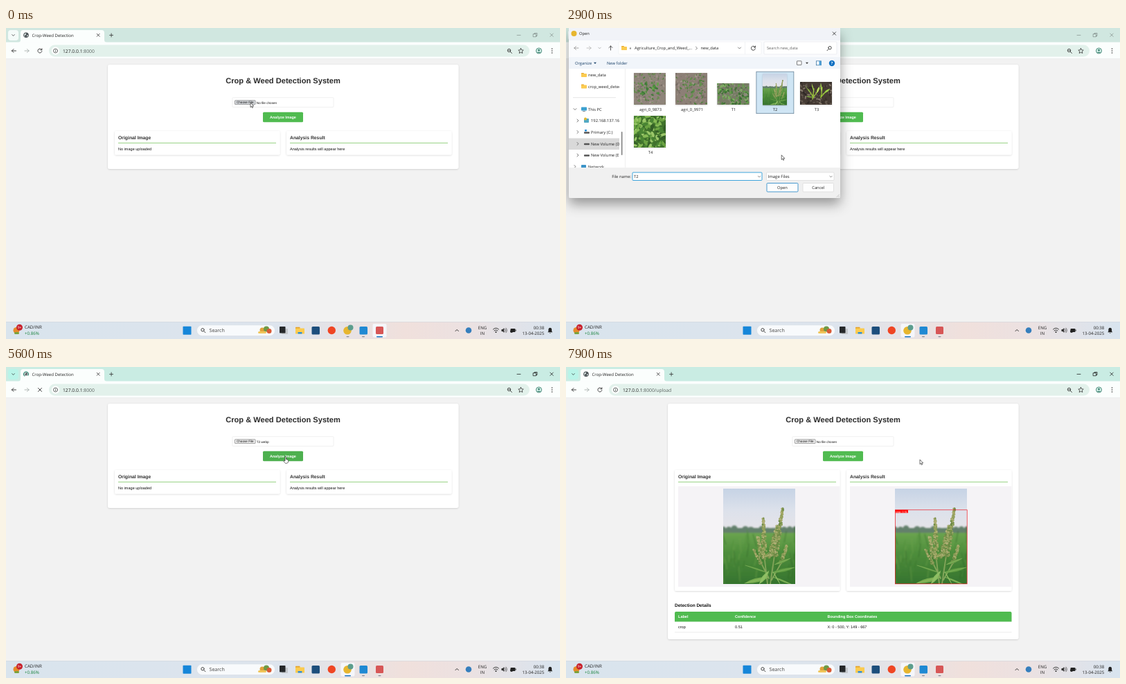
Animation, 800 px wide and 450 px high, one loop 8000 ms. Source, as an HTML page:

```html
<!DOCTYPE html>
<html lang="en">
<head>
<meta charset="utf-8">
<title>Crop-Weed Detection</title>
<style>
  html, body { margin: 0; width: 100%; height: 100%; overflow: hidden; background: #f2f2f2; }
  svg { display: block; text-rendering: geometricPrecision; }
  #stage { width: 800px; height: 450px; }
  .ui { font-family: "Open Sans", "Noto Sans", sans-serif; }
  .web { font-family: "Liberation Sans", Arial, sans-serif; }
</style>
</head>
<body>
<svg id="stage" viewBox="0 0 800 450"></svg>
<script>
const LOOP = 8000, STEP = 100;
const OPEN = 200, PICK = 1900, PRESS = 3600, SHUT = 3900, SEND = 5400, DONE = 6200, LOADED = 6300;
const GREEN = '#50bb50';

// Drawing helpers
const attrs = o => Object.entries(o).map(([k, v]) => ` ${k}="${v}"`).join('');
const rect = (x, y, w, h, fill, o = {}) =>
  `<rect x="${x}" y="${y}" width="${w}" height="${h}" fill="${fill}"${attrs(o)}/>`;
const dot = (x, y, r, fill, o = {}) => `<circle cx="${x}" cy="${y}" r="${r}" fill="${fill}"${attrs(o)}/>`;
const fillPath = (d, fill, o = {}) => `<path d="${d}" fill="${fill}"${attrs(o)}/>`;
const line = (d, color = '#333', width = .8, o = {}) =>
  `<path d="${d}" fill="none" stroke="${color}" stroke-width="${width}" stroke-linecap="round" stroke-linejoin="round"${attrs(o)}/>`;
const text = (cls, x, y, s, size, fill, o) =>
  `<text class="${cls}" x="${x}" y="${y}" font-size="${size}" fill="${fill}"${attrs(o)}>${s}</text>`;
const ui = (x, y, s, size = 5.8, fill = '#222', o = {}) => text('ui', x, y, s, size, fill, o);
const web = (x, y, s, size = 5.56, fill = '#111', o = {}) => text('web', x, y, s, size, fill, o);
const group = (id, body, o = {}) => `<g id="${id}"${attrs(o)}>${body}</g>`;
const box = (x, y, w, h, view, body) =>
  `<svg x="${x}" y="${y}" width="${w}" height="${h}" viewBox="${view}" preserveAspectRatio="none" overflow="hidden">${body}</svg>`;
const mid = { 'text-anchor': 'middle' }, end = { 'text-anchor': 'end' }, bold = { 'font-weight': 700 };
const chevron = (x, y, color = '#444', r = 2) => line(`M${x - r} ${y - r / 2}l${r} ${r}l${r} ${-r}`, color, .7);
const chevronRight = (x, y) => line(`M${x - 1} ${y - 2}l2 2l-2 2`, '#444', .7);
const arrow = (x, y, dir, color) =>
  line(`M${x - 3} ${y}h6M${x + 3 * dir} ${y}l${-2.5 * dir} -2.5M${x + 3 * dir} ${y}l${-2.5 * dir} 2.5`, color, .9);
const reload = (x, y) => line(`M${x + 2.6} ${y - 1.4}a3 3 0 1 0 .3 2M${x + 2.9} ${y - 3.2}v2h-2`, '#333', .9);
const lens = (x, y) => line(`M${x + 1.3} ${y + 1.3}l2.2 2.2M${x + 1.7} ${y - .5}a2.2 2.2 0 1 1 -4.4 0a2.2 2.2 0 1 1 4.4 0`, '#333', .9);
const folder = (x, y, w = 8) =>
  rect(x, y - w * .38, w * .5, w * .4, '#e3a32c', { rx: .6 }) + rect(x, y - w * .25, w, w * .62, '#fbcb50', { rx: .6 });

function rng(seed) {
  return () => (seed = (seed * 16807) % 2147483647) / 2147483647;
}

// Photo stand-ins
function speckle(x, y, w, h, base, colors, count, seed, size = 2.5, spread = 1) {
  const r = rng(seed);
  let s = rect(0, 0, w, h, base);
  for (let i = 0; i < count; i++) {
    const px = w / 2 + (r() - .5) * w * spread, py = h / 2 + (r() - .5) * h * spread;
    const rx = size * (.4 + r()), turn = r() * 180;
    s += `<ellipse cx="${px.toFixed(1)}" cy="${py.toFixed(1)}" rx="${rx.toFixed(1)}" ry="${(rx * .5).toFixed(1)}" fill="${colors[Math.floor(r() * colors.length)]}" transform="rotate(${turn.toFixed(0)} ${px.toFixed(1)} ${py.toFixed(1)})"/>`;
  }
  return box(x, y, w, h, `0 0 ${w} ${h}`, s);
}

function spike(x1, y1, x2, y2, width, seed) {
  const r = rng(seed), n = Math.round((y2 - y1) * 2.2);
  let s = line(`M${x1} ${y1}L${x2} ${y2}`, '#718a48', width * .6);
  for (let i = 0; i < n; i++) {
    const k = i / n, spread = width * (.35 + k * .8);
    s += dot((x1 + (x2 - x1) * k + (r() - .5) * spread * 1.6).toFixed(1), (y1 + (y2 - y1) * k).toFixed(1),
      (.6 + r() * 1.1).toFixed(1), ['#889b56', '#a2a866', '#6c8b45', '#b0b078'][Math.floor(r() * 4)]);
  }
  return s;
}

function leaf(x1, y1, x2, y2, bend, fill) {
  const mx = (x1 + x2) / 2, my = (y1 + y2) / 2;
  return fillPath(`M${x1} ${y1}Q${mx - bend} ${my - bend}  ${x2} ${y2}Q${mx + bend} ${my + bend} ${x1} ${y1}`, fill) +
    line(`M${x1} ${y1}L${x2} ${y2}`, '#a4ca79', .4);
}

function plantPhoto() {
  const r = rng(77);
  let s = rect(0, 0, 104, 68, 'url(#sky)');
  s += `<g filter="url(#soft)">` + rect(-4, 57, 112, 12, '#66806a');
  for (let i = 0; i < 14; i++) s += dot(i * 8, 58 + r() * 4, 3 + r() * 2, '#64806c');
  s += rect(-4, 64, 112, 80, 'url(#field)');
  for (let i = 0; i < 70; i++) {
    const x = r() * 108 - 2, y = 76 + r() * 62;
    s += line(`M${x.toFixed(1)} ${y.toFixed(1)}l${(r() * 10 - 5).toFixed(1)} ${(-8 - r() * 14).toFixed(1)}`,
      ['#6ea44d', '#36702b', '#4d8d39', '#2d6427'][i % 4], 1.1, { opacity: .65 });
  }
  s += '</g>';
  s += line('M68 138L75 90M64 138L58 86M66 130L50 98M70 132L88 100', '#83a45a', 1.8);
  s += spike(86, 29, 74, 98, 5.5, 5) + spike(58, 43, 59, 102, 5, 9) + spike(50, 70, 56, 100, 4, 13) +
    spike(78, 54, 66, 100, 4.5, 21) + spike(92, 82, 83, 108, 3.5, 25) + spike(44, 88, 55, 110, 3, 31);
  s += leaf(66, 122, 32, 111, 4, '#5c963f') + leaf(66, 128, 31, 137, 5, '#79ad50') + leaf(70, 122, 103, 114, 4, '#619d42') +
    leaf(72, 128, 98, 138, 5, '#70a64c') + leaf(66, 119, 52, 138, 4, '#8bbd61') + leaf(72, 120, 82, 138, -4, '#87b95a') +
    leaf(74, 110, 97, 101, 3, '#6b9f48');
  return s;
}

const defs = `<defs>
  <linearGradient id="sky" x2="0" y2="1"><stop stop-color="#c6d3e5"/><stop offset=".45" stop-color="#dce1eb"/><stop offset="1" stop-color="#e9e5e8"/></linearGradient>
  <linearGradient id="field" x2="0" y2="1"><stop stop-color="#6ba44f"/><stop offset=".35" stop-color="#4f8e3c"/><stop offset="1" stop-color="#32702c"/></linearGradient>
  <linearGradient id="bar"><stop stop-color="#d9e4ed"/><stop offset=".5" stop-color="#dde4ed"/><stop offset=".72" stop-color="#f0e0dc"/><stop offset=".83" stop-color="#ece1e1"/><stop offset="1" stop-color="#d8e4ef"/></linearGradient>
  <filter id="soft" x="-10%" y="-10%" width="120%" height="120%"><feGaussianBlur stdDeviation=".8"/></filter>
  <filter id="lift" x="-10%" y="-10%" width="120%" height="130%"><feDropShadow dx="0" dy=".7" stdDeviation="1.2" flood-opacity=".17"/></filter>
  <filter id="deep" x="-15%" y="-15%" width="130%" height="140%"><feDropShadow dx="0" dy="9" stdDeviation="9" flood-opacity=".38"/></filter>
  <symbol id="plant" viewBox="0 0 104 138" preserveAspectRatio="none">${plantPhoto()}</symbol>
</defs>`;
const plant = (x, y, w, h) => `<use href="#plant" x="${x}" y="${y}" width="${w}" height="${h}"/>`;

function browser() {
  const globe = dot(0, 0, 3.8, '#4b5256') + fillPath('M-2.8 -1.2q1.6 -1.6 3 -1.2l-.6 2l-1.6 .6l.6 1.6l-1 .6zM1 .2l1.9 -.4q-.2 2 -1.7 2.6z', '#dfeae7');
  return rect(0, 0, 800, 21, '#c9ece3', { id: 'strip' }) +
    rect(3, 3, 15, 15, '#b9f4e8', { rx: 4, id: 'tabMenu' }) + chevron(10.5, 10.5, '#222', 1.8) +
    fillPath('M17 21q4 0 4 -4v-10q0 -4 4 -4h113q4 0 4 4v10q0 4 4 4z', '#fbfefd') +
    rect(0, 20.5, 800, 24, '#fbfefd') + rect(0, 44, 800, .6, '#dfe7e4') +
    `<g transform="translate(29 10.3)">${group('globe', globe)}${group('spinner', line('M0 -3.4a3.4 3.4 0 1 1 -3.4 3.4', '#21806b', 1))}</g>` +
    ui(37.5, 12.8, 'Crop-Weed Detection', 6.05) +
    line('M131.2 8.3l4 4M135.2 8.3l-4 4M149.6 10.4h5M152.1 7.9v5', '#333', .8) +
    group('controls', line('M738 10.4h5M761.5 8.7h4v4h-4zM763 8.7v-1.2h4v4h-1.4M785.8 8l4.4 4.4M790.2 8l-4.4 4.4', '#222', .8)) +
    arrow(11.5, 33, -1, '#333') + arrow(30, 33, 1, '#a9b0ae') + group('reload', reload(49, 33)) +
    group('stop', line('M46.5 30.5l5 5M51.5 30.5l-5 5', '#333', .9)) +
    rect(62, 24.5, 694, 17, '#e2f1eb', { rx: 8.5 }) + dot(71.5, 33, 5.8, '#fbfefd') +
    line('M74.5 33a3 3 0 1 1 -6 0a3 3 0 1 1 6 0M71.5 32.8v1.6M71.5 31.3v.1', '#333', .7) +
    `<text class="ui" x="82" y="35.5" font-size="6.75" fill="#222">127.0.0.1<tspan id="path" fill="#58615e">:8000</tspan></text>` +
    lens(727, 33) + line('M725.3 32.5h2.4', '#333', .6) +
    line('M743.5 29.4l1.1 2.4l2.6 .3l-1.9 1.8l.5 2.6l-2.3 -1.3l-2.3 1.3l.5 -2.6l-1.9 -1.8l2.6 -.3z', '#333', .8) +
    dot(769.5, 33, 4, '#d5f2ea', { stroke: '#27705f', 'stroke-width': .8 }) + dot(769.5, 32, 1.3, '#27705f') +
    fillPath('M767 35.7q2.5 -2.6 5 0z', '#27705f') + [30, 33, 36].map(y => dot(788.5, y, .8, '#333')).join('');
}

function panel(x, title, note) {
  return rect(x, 149, 238.5, 34.5, '#fff', { rx: 2, filter: 'url(#lift)', class: 'panel' }) +
    web(x + 5, 161, title, 6.82, '#333', bold) + rect(x + 5, 165.9, 228, .8, '#7dc663') +
    web(x + 5, 177, note, 5.56, '#111', { class: 'note' });
}

function page() {
  const shot = x => rect(x, 172.5, 233.3, 145.5, '#f5f3f6') + plant(x + 65, 176, 104, 138);
  const cols = [162, 244, 377.5];
  const row = (y, cells, fill, o) => cells.map((c, i) => web(cols[i], y, c, 5.56, fill, o)).join('');
  return rect(0, 44.5, 800, 381, '#f2f2f2') +
    rect(147, 53, 506.5, 151, '#fff', { rx: 3, filter: 'url(#lift)', id: 'card' }) +
    web(400, 80.3, 'Crop &amp; Weed Detection System', 11.1, '#2b2b2b', { ...bold, ...mid }) +
    rect(327, 100.7, 146, 13.8, '#fff', { rx: 1, stroke: '#e6e6e6', 'stroke-width': .6 }) +
    rect(330.5, 104.8, 29.6, 5.8, '#efefef', { rx: .6, stroke: '#666', 'stroke-width': .6, id: 'choose' }) +
    web(345.3, 109.3, 'Choose File', 4.63, '#000', mid) + web(361.8, 109.5, 'No file chosen', 4.63, '#111', { id: 'chosen' }) +
    rect(371, 121.8, 58, 14.4, GREEN, { rx: 1.5, id: 'analyze' }) + web(400, 130.9, 'Analyze Image', 5.45, '#fff', { ...bold, ...mid }) +
    panel(157, 'Original Image', 'No image uploaded') + panel(405, 'Analysis Result', 'Analysis results will appear here') +
    group('results', shot(162) + shot(410) +
      rect(475.4, 206.8, 103.8, 107, 'none', { stroke: '#ec1c24', 'stroke-width': .7 }) +
      rect(475.4, 206.8, 18.5, 4.4, '#f00') + web(476, 210.5, 'crop: 0.51', 3.8, '#fff') +
      web(157, 347, 'Detection Details', 6.5, '#111', bold) + fillPath('M157 368.5v-12.5q0 -2 2 -2h482.500q2 0 2 2v12.5z', GREEN) +
      row(363.2, ['Label', 'Confidence', 'Bounding Box Coordinates'], '#fff', bold) +
      row(378.2, ['crop', '0.51', 'X: 0 - 500, Y: 149 - 667'], '#111') + rect(157, 383.6, 486.5, .6, '#dedede'));
}

function taskbar() {
  const under = x => rect(x - 2, 446, 4, 1.2, '#858b94', { rx: .6 });
  const tile = (id, x) => group(id, rect(x - 10, 428, 20, 19.5, '#f5f6fa', { rx: 2 }) + rect(x - 4.5, 446, 9, 1.4, '#1674c4', { rx: .7 }));
  return rect(0, 425, 800, 25, 'url(#bar)') + rect(0, 425, 800, .5, '#ccd3da') +
    dot(15, 437.5, 4.5, '#e58a2c') + dot(19.5, 433.3, 4.5, '#c8202b') + ui(19.5, 435.3, '9+', 5, '#fff', mid) + rect(12, 440, 7, 3, '#7aa23b', { rx: 1.5 }) +
    ui(27, 435.4, 'CAD/INR', 6.2) + ui(27, 443.8, '+0.86%', 6.2, '#17803a') +
    rect(255.500, 431.7, 12, 12, '#1686d9', { rx: .8 }) +
    rect(275.5, 429.8, 113, 15.8, '#f8fafc', { rx: 7.9, stroke: '#d3d8de', 'stroke-width': .5 }) + lens(284.5, 437.3) + ui(293.5, 440.2, 'Search', 7.1, '#444') +
    dot(370, 437, 3.5, '#e0a23a') + dot(376, 435.5, 4, '#6f9a45') + dot(380, 438.5, 3.5, '#d95a35') + rect(364, 439, 12, 3, '#f0c65a', { rx: 1.5 }) +
    rect(398, 435, 9, 8, '#c4c8cc', { rx: .8 }) + rect(395, 432, 8.5, 9.5, '#25282b', { rx: .8 }) +
    folder(418, 437.8, 13) + rect(421.5, 440, 6, 2.6, '#2d8fd8', { rx: .6 }) +
    rect(441.5, 432, 11.5, 11.5, '#1c4e7c', { rx: 1.5 }) + dot(470.3, 437.5, 5.7, '#ef4523') +
    under(493.5) + under(516) + under(539.5) + tile('browserTile', 493.5) + tile('clipTile', 539.5) +
    dot(493, 437.8, 5.8, '#e7b62f') + dot(497.5, 433.5, 4, '#5c9d8e') +
    rect(510.5, 432, 11.5, 11.5, '#2089d3', { rx: 1.5 }) + rect(534, 432, 11, 11, '#d75656', { rx: 1.5 }) +
    line('M649 438.6l2.2 -2.2l2.2 2.2', '#222', .9) + dot(668, 437.5, 4.3, '#357ebd') +
    ui(688, 435.5, 'ENG', 6.1, '#222', mid) + ui(688, 443.6, 'IN', 6.1, '#222', mid) +
    line('M703.5 436q4 -3.8 8 0M705 437.9q2.500 -2.3 5 0', '#222', .9) + dot(707.5, 440, 1, '#222') +
    fillPath('M715.5 436h1.600l2.2 -2v7l-2.200 -2h-1.600z', '#333') + line('M720.700 435.500q1.500 2 0 4M722 434.200q2.800 3.300 0 6.600', '#333', .7) +
    rect(728.500, 435, 7, 5, '#222', { rx: 1 }) + rect(735.700, 436.500, .9, 2, '#222') + dot(730, 439, 2, '#222') +
    ui(777.3, 435.6, '00:38', 6.1, '#222', end) + ui(777.3, 443.800, '13-04-2025', 6.1, '#222', end) +
    fillPath('M782.300 440.200l1 -1.500v-2.500q.2 -2.400 2.400 -2.400t2.400 2.400v2.500l1 1.500zM784.700 441h2q-1 1.500 -2 0z', '#222');
}

const tileX = i => 94.5 + 60 * i;

function sidebar() {
  const row = (y, label, icon) => chevronRight(13, y - 17) + icon + ui(32, y - 14.9, label);
  const drive = y => rect(22, y - 18.2, 8, 2.4, '#555', { rx: .8 });
  return box(4, 59, 73, 143, '0 0 73 143', `<g transform="translate(-4 -42)">` +
    rect(4, 142.5, 73, 16.5, '#d9d9d9') + folder(22, 51) + ui(32, 53, 'new_data') + folder(22, 67.5) + ui(32, 69.6, 'crop_weed_detection') +
    rect(10, 83.5, 62, .6, '#d5d5d5') + chevron(13, 100.500, '#444') + rect(22, 97.5, 8, 5, '#3ba0cf', { rx: .7 }) + rect(24, 103, 4, .8, '#66757f') + ui(32, 102.6, 'This PC') +
    `<g transform="translate(4 0)">` + row(134, '192.168.137.16', rect(22, 114, 7, 6, '#51a9c4', { rx: .7 }) + dot(24, 114.500, 2, '#e0b833')) +
    row(150.5, 'Primary (C:)', drive(151.5) + rect(23, 130, 3, 2.5, '#2a8dd6')) +
    row(167.5, 'New Volume (D:)', drive(168)) + row(184, 'New Volume (E:)', drive(184.500)) + '</g>' +
    chevronRight(13, 183.500) + rect(22, 181, 7, 5, '#3c94c8', { rx: .7 }) + ui(32, 186, 'Network') + '</g>') +
    rect(79.8, 150, 1.7, 34, '#858585', { rx: .8 }) + rect(85, 59, .6, 143, '#e5e5e5');
}

function thumbs() {
  const soil = ['#8f8379', '#a3968c', '#786d66', '#6d8a55', '#52813f', '#998b82'];
  const labels = ['agri_0_9873', 'agri_0_9971', 'T1', 'T2', 'T3'];
  const frame = (x, y, w, h) => rect(x, y, w, h, '#888', { filter: 'url(#lift)' });
  const sprout = box(338, 78, 46, 33, '0 0 46 33', speckle(0, 0, 46, 33, '#453b34', ['#2f2926', '#655a50', '#85796c', '#39312b'], 90, 41, 2) +
    line('M18 25L20 10M19 22L12 11M30 23L32 8M30 22L38 13M18 24L25 14', '#9bcb36', 1.3) +
    leaf(20, 14, 17, 3, 2, '#a9df3e') + leaf(13, 14, 8, 6, 2, '#86bd31') + leaf(31, 14, 30, 2, 2, '#b3e44a') +
    leaf(35, 16, 43, 10, 2, '#9bd23c') + leaf(24, 16, 28, 7, 2, '#c2ea59') + leaf(18, 22, 9, 21, 2, '#79b12f'));
  return frame(98, 65, 46, 46) + speckle(98, 65, 46, 46, '#8e847a', soil, 200, 3, 1.8) +
    speckle(107, 78, 28, 20, 'none', ['#4f8c3f', '#69a14e', '#3d7a36'], 34, 8, 2.5, .9) +
    frame(158, 65, 46, 46) + speckle(158, 65, 46, 46, '#8c7f76', soil, 200, 14, 1.8) +
    speckle(172, 70, 26, 32, 'none', ['#4f8344', '#638f4d'], 20, 18, 2.300, .9) +
    frame(218.5, 80, 46, 31) + speckle(218.5, 80, 46, 31, '#787c66', ['#49823b', '#639a4a', '#8c8d7b', '#3a6d32', '#7fae62'], 170, 23, 2) +
    frame(284, 66, 35, 45.5) + plant(284, 66, 35, 45.5) + frame(338, 78, 46, 33) + sprout +
    frame(98, 127, 46, 46) + speckle(98, 127, 46, 46, '#40722c', ['#6ba342', '#86ba55', '#4a8534', '#9bc76a', '#345f27'], 170, 33, 3.6) +
    labels.map((s, i) => ui(tileX(i) + 27.5, 120.2, s, 5.8, '#222', mid)).join('') + ui(122, 182, 'T4', 5.8, '#222', mid);
}

function dialog() {
  const field = { stroke: '#d4d4d4', 'stroke-width': .6, rx: 1 };
  return fillPath('M4 0H396V243q0 3 -3 3H7q-3 0 -3 -3z', '#f0f0f0', { filter: 'url(#deep)' }) +
    rect(4, 0, 392, 18, '#f1f3f8') + rect(4, 18, 392, 24, '#fafbfd') + rect(4, 42, 392, 17, '#f1f5fa') + rect(4, 59, 392, 143, '#fff') +
    dot(11.5, 8, 4, '#e7b62f') + ui(19, 10.2, 'Open') + line('M385.2 5.800l4.400 4.400M389.600 5.800l-4.400 4.400', '#222', .8) +
    arrow(15, 29, -1, '#999') + arrow(33, 29, 1, '#bbb') + chevron(48.5, 29, '#999', 1.7) + line('M64.500 32v-6M62 28.500l2.500 -2.500l2.500 2.500', '#333', .8) +
    rect(76, 20, 206, 18, '#fff', { ...field, stroke: '#eceef1' }) + folder(80, 29) + ui(91.5, 31, '«') + ui(99, 31, 'Agriculture_Crop_and_Weed_...') +
    chevronRight(188.5, 29.2) + ui(194.5, 31, 'new_data') + chevron(250.5, 29) + rect(258.500, 20, .5, 18, '#e5e7ea') + reload(270.5, 29.2) +
    rect(286, 20, 105, 18, '#fff', { ...field, stroke: '#e2e5e9' }) + ui(290, 31.2, 'Search new_data', 5.7, '#666') +
    `<g transform="translate(761 0) scale(-1 1)">${lens(380.5, 29.2)}</g>` +
    ui(13, 53, 'Organize', 5.8, '#173f67') + fillPath('M40 49.800h4l-2 2.200z', '#173f67') + ui(59, 53, 'New folder', 5.8, '#173f67') +
    rect(333.5, 47.8, 6.5, 5.6, '#fff', { stroke: '#444', 'stroke-width': .7, rx: .4 }) + fillPath('M346 49.800h4l-2 2.200z', '#333') +
    rect(361.5, 47.8, 7, 6, '#fff', { stroke: '#27679c', 'stroke-width': .7 }) + rect(365.5, 47.8, 3, 6, '#4b9fd7') +
    dot(384, 51, 4.2, '#0b6fc2') + ui(384, 53.2, '?', 6, '#fff', { ...mid, ...bold }) +
    sidebar() + rect(0, 63, 55, 61, '#eaf3fb', { id: 'hover' }) +
    rect(tileX(3) + .4, 63.2, 54, 60.5, '#cfe5f4', { stroke: '#55738a', 'stroke-width': .7, id: 'picked' }) + thumbs() +
    ui(94, 217, 'File name:', 5.85, '#222', end) + rect(96, 209, 187, 11.5, '#fff', { ...field, id: 'nameBox' }) +
    ui(98, 217, 'T2', 5.8, '#222', { id: 'name' }) + rect(97.6, 211.3, .5, 7, '#222', { id: 'caret' }) + chevron(279, 215, '#555', 1.6) +
    rect(289.5, 209, 97.5, 11.5, '#fff', field) + ui(291.5, 217, 'Image Files', 6) + chevron(382.5, 215, '#555', 1.6) +
    rect(290, 224.5, 45, 12.500, '#fdfdfd', { stroke: '#1b81c5', 'stroke-width': .8, rx: 1.2, id: 'openBtn' }) +
    rect(291.500, 226, 42, 9.5, 'none', { stroke: '#333', 'stroke-width': .4, 'stroke-dasharray': '.6 .6', id: 'focusRing' }) +
    ui(312.5, 232.800, 'Open', 5.8, '#222', mid) + rect(342, 224.5, 44.500, 12.500, '#fdfdfd', field) + ui(364.2, 232.8, 'Cancel', 5.8, '#222', mid) +
    line('M391 244.500l3.500 -3.500M393.300 244.500l1.200 -1.200', '#aaa', .6);
}

const ink = { stroke: '#111', 'stroke-width': .6, 'stroke-linejoin': 'round' };
const pointer = group('pointer',
  group('arrow', fillPath('M0 0v6.700l1.500 -1.400l1 2.300l1.100 -.5l-1 -2.200h2.100z', '#fff', ink)) +
  group('hand', fillPath('M-1 1q0 -1 .8 -1t.8 1v3q3.200 .2 3.200 2.200q0 3.400 -2.300 3.600h-2q-1 -.5 -2.700 -3.400q.5 -1.200 2.200 0z', '#fff', ink)));

const stage = document.getElementById('stage');
stage.innerHTML = defs + browser() + page() + taskbar() + group('dialog', dialog()) + pointer;

const el = {};
stage.querySelectorAll('[id]').forEach(n => el[n.id] = n);
const panels = stage.querySelectorAll('.panel'), notes = stage.querySelectorAll('.note');
const show = (node, on) => node.setAttribute('visibility', on ? 'inherit' : 'hidden');
const set = (node, key, value) => node.setAttribute(key, value);

// Pointer stops: time, x, y
const stops = [
  [0, 353, 108], [1000, 353, 108], [1800, 308, 97], [2300, 308, 97], [3300, 313, 231], [3900, 313, 231],
  [4500, 370, 164], [5000, 404, 129.5], [6400, 404, 129.5], [7400, 511, 134], [8000, 511, 134]
];

function pointerAt(t) {
  const i = stops.findIndex((s, n) => n === stops.length - 1 || t < stops[n + 1][0]);
  const a = stops[i], b = stops[i + 1] || a;
  const k = b === a ? 0 : (t - a[0]) / (b[0] - a[0]), e = k * k * (3 - 2 * k);
  return [a[1] + (b[1] - a[1]) * e, a[2] + (b[2] - a[2]) * e];
}

function draw(t) {
  const [x, y] = pointerAt(t);
  const inside = (l, top, w, h) => x >= l && x <= l + w && y >= top && y <= top + h;
  const open = t >= OPEN && t < SHUT, active = t >= SHUT, done = t >= DONE;
  const loading = t >= SEND && t < LOADED, onButton = !open && inside(371, 122, 58, 14);

  set(el.strip, 'fill', active ? '#c9ece3' : '#d0e7e0');
  set(el.tabMenu, 'fill', active ? '#b9f4e8' : '#f4fbf9');
  set(el.controls, 'opacity', active ? 1 : .4);
  show(el.clipTile, t < OPEN);
  show(el.browserTile, t >= OPEN);
  show(el.spinner, loading);
  set(el.spinner, 'transform', `rotate(${t * .36 % 360})`);
  set(el.globe, 'transform', `scale(${loading || (t >= LOADED && t < LOADED + 200) ? .6 : 1})`);
  show(el.reload, !loading);
  show(el.stop, loading);
  el.path.textContent = done ? ':8000/upload' : ':8000';

  set(el.choose, 'fill', t < SHUT ? '#d7dade' : '#efefef');
  el.chosen.textContent = active && !done ? 'T2.webp' : 'No file chosen';
  set(el.analyze, 'fill', onButton ? '#4db04f' : GREEN);
  set(el.card, 'height', done ? 341 : 151);
  panels.forEach(p => set(p, 'height', done ? 175 : 34.5));
  notes.forEach(n => show(n, !done));
  show(el.results, done);

  show(el.dialog, open);
  if (open) {
    const col = Math.floor((x - tileX(0)) / 60), picked = t >= PICK, typing = t < PRESS;
    show(el.hover, y >= 63 && y <= 124 && inside(tileX(col), 63, 55, 61));
    set(el.hover, 'x', tileX(col));
    show(el.picked, picked);
    show(el.name, picked);
    show(el.caret, picked && typing && t % 1000 < 500);
    set(el.nameBox, 'stroke', typing ? '#2a9bd8' : '#c4c4c4');
    set(el.nameBox, 'stroke-width', typing ? .9 : .6);
    set(el.openBtn, 'fill', inside(290, 224, 45, 13) ? '#dcecf8' : '#fdfdfd');
    show(el.focusRing, !typing);
  }

  set(el.pointer, 'transform', `translate(${x.toFixed(1)} ${y.toFixed(1)})`);
  show(el.arrow, !onButton);
  show(el.hand, onButton);
}

const start = performance.now();
function tick() {
  const t = (performance.now() - start) % LOOP;
  draw(Math.floor(t / STEP) * STEP);
  requestAnimationFrame(tick);
}
tick();
</script>
</body>
</html>
```
